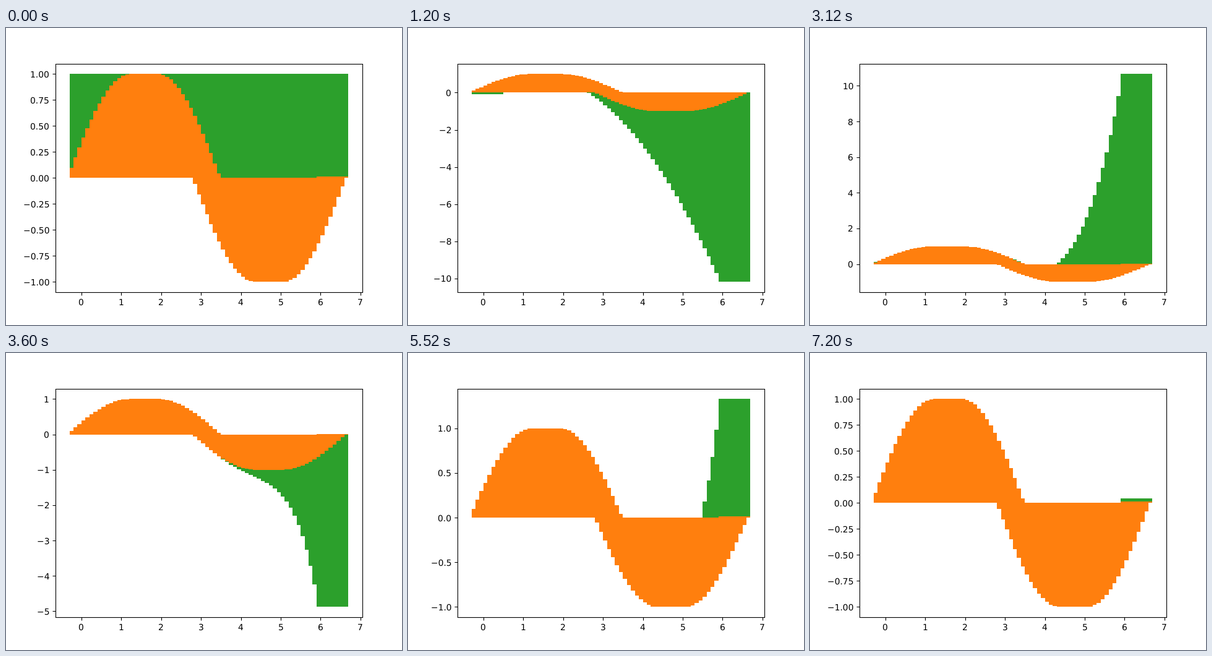
An HTML page for the animation above (8 s loop, 640 by 480 pixels).

```html
<!DOCTYPE html>
<html>
<head>
<meta charset="utf-8">
<style>
  html, body { margin: 0; width: 100%; height: 100%; overflow: hidden; background: #fff; }
  svg { display: block; width: 640px; height: 480px; }
  text { font: 13.8889px "DejaVu Sans", sans-serif; text-rendering: geometricPrecision; }
  .line { fill: none; stroke: #000; stroke-width: 1.1111; }
</style>
</head>
<body>
<svg viewBox="0 0 640 480">
  <rect width="640" height="480" fill="#fff"/>
  <path id="series" fill="#2ca02c"/>
  <path id="sine" fill="#ff7f0e"/>
  <path id="ticks" class="line"/>
  <rect class="line" x="80.5" y="58.5" width="496" height="369"/>
  <g id="labels"></g>
</svg>
<script>
const LOOP = 8000, HOLD = 1200;
const LEFT = 80, RIGHT = 576, TOP = 57.6, BOTTOM = 427.2;
const EM = 13.8889, MINUS = '\u2212';
const $ = id => document.getElementById(id);
const xs = Array.from({ length: 63 }, (_, i) => (i + 1) / 10);
const sines = xs.map(Math.sin);
const xPix = x => LEFT + (x + 0.65) / 7.7 * (RIGHT - LEFT);

// Taylor polynomial of sin around pi/2, up to degree 2 * order
function taylor(x, order) {
  const u = x - Math.PI / 2;
  let term = 1, sum = 1;
  for (let k = 1; k <= order; k++) {
    term *= -u * u / (2 * k * (2 * k - 1));
    sum += term;
  }
  return sum;
}

// Overlapping bars, 0.8 wide, snapped to whole pixels
function bars(heights, yPix) {
  const zero = Math.round(yPix(0));
  return heights.map((h, i) => {
    const x0 = Math.round(xPix(xs[i] - 0.4)), x1 = Math.round(xPix(xs[i] + 0.4));
    const y = Math.round(yPix(h));
    return `M${x0} ${Math.min(y, zero)}H${x1}V${Math.max(y, zero)}H${x0}Z`;
  }).join('');
}

function textWidth(s) {
  let w = 0;
  for (const c of s) w += c === MINUS ? 0.8379 : c === '.' ? 0.3179 : 0.6362;
  return w * EM;
}

function label(s, x, y) {
  return `<text x="${Math.round(x)}" y="${Math.round(y)}">${s}</text>`;
}

function draw(order) {
  const poly = xs.map(x => taylor(x, order));
  const all = sines.concat(poly);
  const min = Math.min(...all), max = Math.max(...all);
  const pad = (max - min) * 0.05, low = min - pad, high = max + pad;
  const yPix = y => BOTTOM - (y - low) / (high - low) * (BOTTOM - TOP);

  $('series').setAttribute('d', bars(poly, yPix));
  $('sine').setAttribute('d', bars(sines, yPix));

  let ticks = '', labels = '';
  for (let x = 0; x <= 7; x++) {
    const px = xPix(x);
    ticks += `M${Math.round(px) + 0.5} 427.5v5`;
    labels += label(String(x), px - textWidth('0') / 2, 448);
  }
  const step = [0.25, 0.5, 1, 2].find(s => (high - low) / s <= 9);
  const digits = step === 0.25 ? 2 : step === 0.5 ? 1 : 0;
  for (let k = Math.ceil(low / step); k * step <= high; k++) {
    const y = k * step, py = yPix(y);
    const s = (y < 0 ? MINUS : '') + Math.abs(y).toFixed(digits);
    ticks += `M80.5 ${Math.round(py) + 0.5}h-5`;
    labels += label(s, 70.28 - textWidth(s), py + 5.5);
  }
  $('ticks').setAttribute('d', ticks);
  $('labels').innerHTML = labels;
}

let shown = -1;
const start = performance.now();
function update() {
  const order = Math.floor((performance.now() - start) % LOOP / HOLD);
  if (order !== shown) draw(shown = order);
  requestAnimationFrame(update);
}
update();
</script>
</body>
</html>
```
